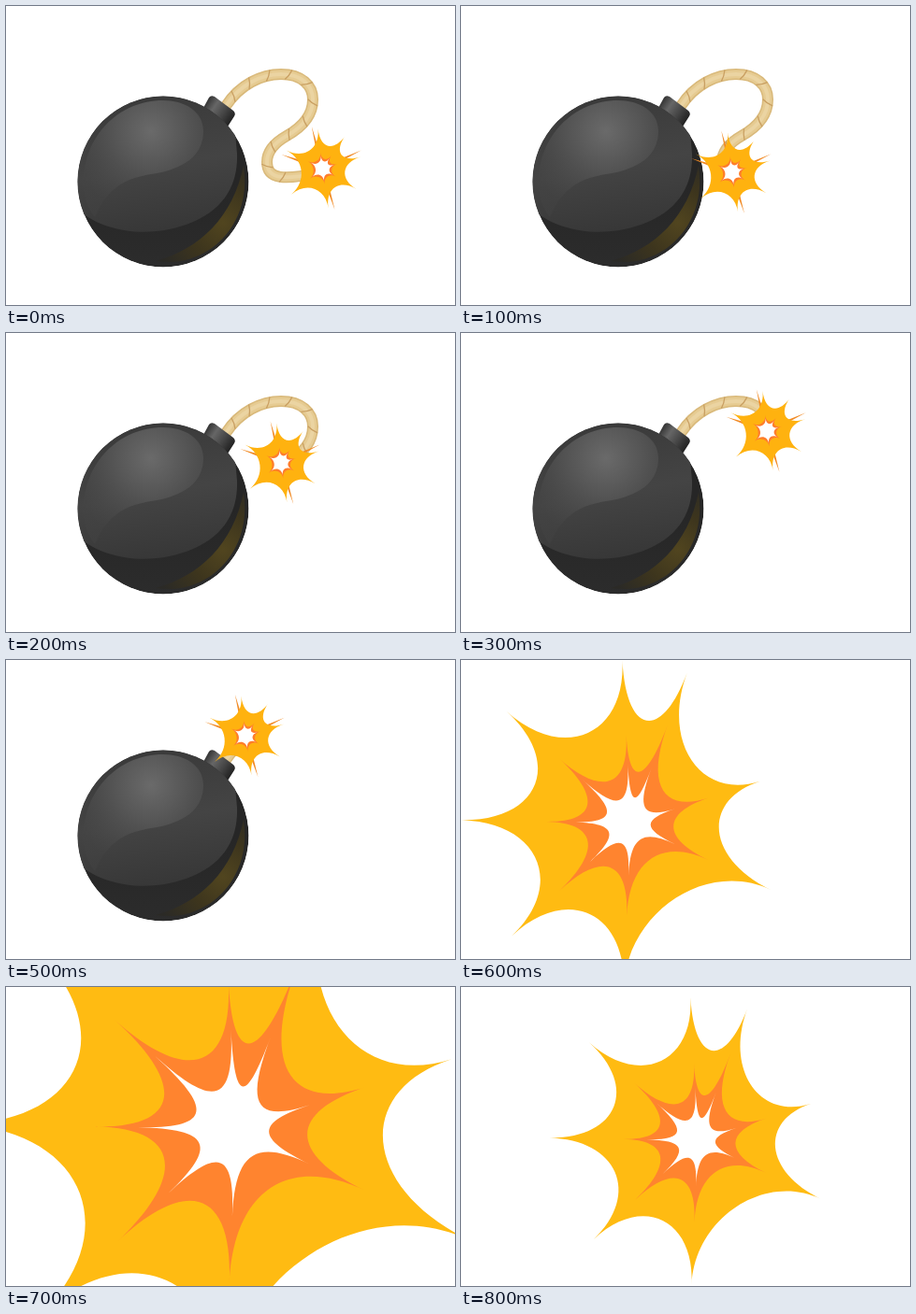
Write an HTML page with a canvas that moves like this. It is 480 px wide and 320 px high and loops after 900 ms.

```html
<!DOCTYPE html>
<html>
<head>
<meta charset="utf-8">
<title>Bomb</title>
<style>
html, body { margin: 0; width: 100%; height: 100%; overflow: hidden; background: #fff; }
canvas { display: block; }
</style>
</head>
<body>
<canvas id="stage" width="480" height="320"></canvas>
<script>
const ctx = document.getElementById('stage').getContext('2d');
const STEP = 100, BURN_STEPS = 6;

// Star with a tip per angle; each side sags towards the centre
function star(angles, radii, sag) {
  const tips = angles.map((deg, i) => {
    const a = deg * Math.PI / 180, r = radii[i] ?? radii[0];
    return [r * Math.cos(a), r * Math.sin(a)];
  });
  const path = new Path2D(), k = 1 - sag;
  path.moveTo(...tips[0]);
  tips.forEach(([x, y], i) => {
    const [nx, ny] = tips[(i + 1) % tips.length];
    path.bezierCurveTo(x * k, y * k, nx * k, ny * k, nx, ny);
  });
  path.closePath();
  return path;
}

const blastAngles = [-93, -69.5, -18, 25.5, 92.5, 136.5, 181, 222];
const blastLayers = [
  ['#ffbb12', star(blastAngles, [291, 286, 242, 277, 294, 293, 303, 298], 0.46)],
  ['#ff842f', star(blastAngles, [158, 188, 146, 153, 166, 176, 151, 175], 0.6)],
  ['#fff', star(blastAngles, [107, 105, 83, 88, 94, 100, 105, 117], 0.74)]
];
const blastPoses = [
  { x: 181.6, y: 174.6, size: 0.6 },
  { x: 246, y: 152, size: 1 },
  { x: 253.4, y: 164.2, size: 0.526 }
];

const sparkAngles = [-96, -55, -17, 31, 81, 140, 207];
const sparkLayers = [
  ['#ffb20f', star(sparkAngles, [43], 0.5)],
  ['#ff7d2a', star(sparkAngles, [17], 0.45)],
  ['#fff', star(sparkAngles, [13.5], 0.5)]
];

const fuseShape = 'M235 107C250 84 273 73 294 73C316 73 328 85 328 100C328 118 316 130 300 139' +
  'C286 147 279 157 279 167C279 187 300 186 338 178';
const fuse = new Path2D(fuseShape);
const fuseLine = document.createElementNS('http://www.w3.org/2000/svg', 'path');
fuseLine.setAttribute('d', fuseShape);
const fuseLength = fuseLine.getTotalLength();

const ball = new Path2D();
ball.arc(168, 188, 91.5, 0, Math.PI * 2);
const body = new Path2D('M70 212C105 247 160 248 200 231C236 215 248 188 247 158L240 80L70 80Z');
const gloss = new Path2D('M95 226C108 196 125 185 155 180C190 175 211 160 211 134C211 112 190 101 168 101' +
  'C120 101 83 140 83 188C83 204 87 216 95 226Z');
const glow = new Path2D('M254 170C264 235 215 282 160 273C207 260 243 226 254 170Z');
const cap = new Path2D('M217 98Q219 95 223 97L243 112Q246 115 244 118L237 129L211 109Z');

function fill(path, style) {
  ctx.fillStyle = style;
  ctx.fill(path);
}

function ramp(gradient, colors) {
  colors.forEach((c, i) => gradient.addColorStop(i / (colors.length - 1), c));
  return gradient;
}

const linear = (x0, y0, x1, y1, ...colors) => ramp(ctx.createLinearGradient(x0, y0, x1, y1), colors);
const radial = (x, y, r, ...colors) => ramp(ctx.createRadialGradient(x, y, 0, x, y, r), colors);

function drawLayers(layers, x, y, size = 1) {
  ctx.save();
  ctx.translate(x, y);
  ctx.scale(size, size);
  layers.forEach(([color, path]) => fill(path, color));
  ctx.restore();
}

function drawFuse(length) {
  ctx.save();
  ctx.setLineDash([length, fuseLength]);
  [['#d9b97a', 12], ['#e6cb92', 9], ['#ebd4a2', 4]].forEach(([color, width]) => {
    ctx.strokeStyle = color;
    ctx.lineWidth = width;
    ctx.stroke(fuse);
  });
  ctx.restore();

  ctx.strokeStyle = '#c99f62';
  ctx.lineWidth = 1.3;
  for (let s = 13; s < length; s += 22) {
    const p = fuseLine.getPointAtLength(s), q = fuseLine.getPointAtLength(s + 1);
    ctx.save();
    ctx.translate(p.x, p.y);
    ctx.rotate(Math.atan2(q.y - p.y, q.x - p.x));
    ctx.beginPath();
    ctx.moveTo(3, -5.5);
    ctx.quadraticCurveTo(1, 1, -3, 5.5);
    ctx.stroke();
    ctx.restore();
  }
}

function drawBomb() {
  fill(cap, linear(212, 102, 242, 123, '#2b2b2b', '#666', '#444', '#1f1f1f'));
  ctx.save();
  ctx.clip(ball);
  fill(ball, linear(168, 97, 168, 280, '#262626', '#262626', '#2c2c2c'));
  fill(glow, radial(232, 232, 75, '#51451f', '#3d351d', '#2b2a26'));
  fill(body, linear(150, 97, 175, 245, '#3a3a3a', '#444', '#363636'));
  fill(gloss, radial(155, 134, 90, '#6a6a6a', '#525252', 'rgba(68,68,68,.4)'));
  ctx.restore();
}

function drawSpark(x, y) {
  ctx.save();
  ctx.translate(x, y);
  // Thin streaks beside every other tip
  ctx.fillStyle = '#f18a24';
  for (let i = 0; i < sparkAngles.length; i += 2) {
    ctx.save();
    ctx.rotate((sparkAngles[i] - 8) * Math.PI / 180);
    ctx.beginPath();
    ctx.moveTo(46, 0);
    ctx.lineTo(24, -1.3);
    ctx.lineTo(24, 1.3);
    ctx.fill();
    ctx.restore();
  }
  ctx.restore();
  drawLayers(sparkLayers, x, y);
}

function draw(step) {
  ctx.fillStyle = '#fff';
  ctx.fillRect(0, 0, 480, 320);
  if (step >= BURN_STEPS) {
    const { x, y, size } = blastPoses[step - BURN_STEPS];
    drawLayers(blastLayers, x, y, size);
    return;
  }
  // The fuse burns down at a steady speed
  const length = fuseLength * (1 - 0.178 * step);
  const end = fuseLine.getPointAtLength(length);
  drawFuse(length - 5);
  drawBomb();
  drawSpark(end.x, end.y - 4);
}

const start = performance.now();
function tick() {
  const step = Math.floor((performance.now() - start) / STEP);
  draw(step % (BURN_STEPS + blastPoses.length));
  requestAnimationFrame(tick);
}
tick();
</script>
</body>
</html>
```
